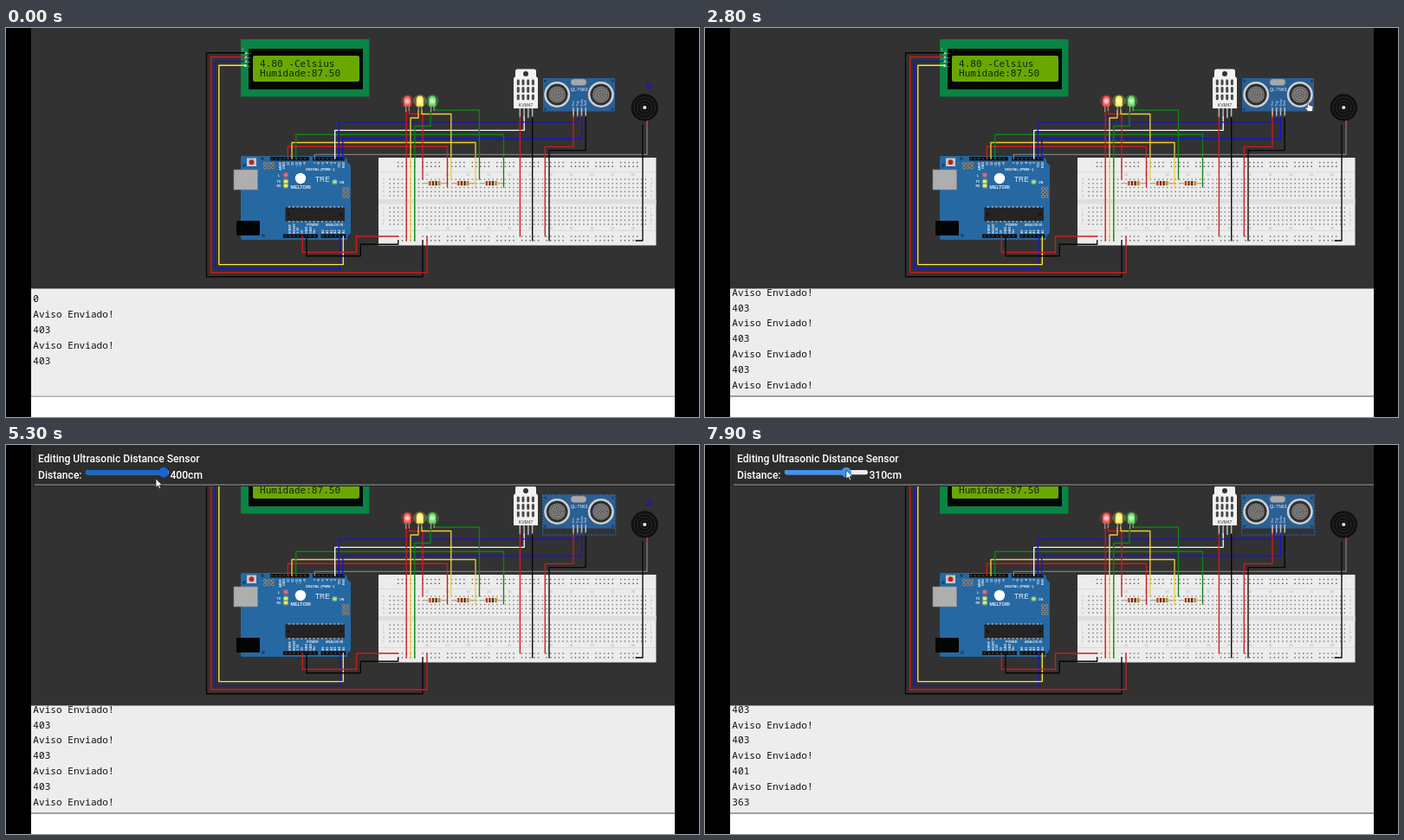
An HTML page for the animation above (8 s loop, 800 by 450 pixels).

```html
<!DOCTYPE html>
<html lang="pt">
<head>
<meta charset="utf-8">
<title>Circuit simulation</title>
<style>
html, body { margin: 0; width: 100%; height: 100%; overflow: hidden; background: #000; }
svg { display: block; width: 800px; height: 450px; }
text { white-space: pre; }
.ui { font: 500 12.1px Roboto, sans-serif; fill: #fff; }
.log { font: 11.12px "Noto Sans Mono", "DejaVu Sans Mono", monospace; fill: #111; }
.lcd { font: 11.05px "DejaVu Sans Mono", monospace; fill: #14230a; }
.tiny { font: 3.6px "Liberation Sans", Arial, sans-serif; fill: #e8f0f8; }
.bold { font-weight: bold; }
</style>
</head>
<body>
<svg id="stage" viewBox="0 0 800 450">
  <defs>
    <clipPath id="logClip"><rect x="29" y="302" width="743" height="123"/></clipPath>
    <radialGradient id="shine">
      <stop offset="0" stop-color="#fff" stop-opacity=".95"/>
      <stop offset="1" stop-color="#fff" stop-opacity="0"/>
    </radialGradient>
  </defs>
</svg>
<script>
const LOOP = 8000;
const svg = document.getElementById('stage');

function el(tag, attrs, parent = svg) {
  const node = document.createElementNS('http://www.w3.org/2000/svg', tag);
  for (const key in attrs) node.setAttribute(key, attrs[key]);
  parent.appendChild(node);
  return node;
}
const rect = (x, y, width, height, fill, more, parent) =>
  el('rect', { x, y, width, height, fill, ...more }, parent);
const circle = (cx, cy, r, fill, more, parent) =>
  el('circle', { cx, cy, r, fill, ...more }, parent);
const path = (d, more, parent) => el('path', { d, fill: 'none', ...more }, parent);
function text(x, y, str, cls, more, parent) {
  const node = el('text', { x, y, class: cls, ...more }, parent);
  node.textContent = str;
  return node;
}
const wire = (color, d) =>
  path(d, { stroke: color, 'stroke-width': 1.35, 'stroke-linejoin': 'round', 'stroke-linecap': 'round' });

const RED = '#d3191b', BLACK = '#060606', BLUE = '#1414d8', YELLOW = '#fbe840', GOLD = '#f0cc34',
      GREEN = '#0c8418', GRAY = '#7c7c7c', WHITE = '#f4f4f4';

// Workspace
rect(29, 0, 743, 302, '#323232');

function drawLcd() {
  rect(271, 13, 148.5, 66.5, '#098444');
  rect(280, 24, 132, 47, '#050505');
  rect(285, 32, 123, 30, '#69a800', { rx: 2 });
  text(293, 45, '4.80 -Celsius', 'lcd');
  text(293, 55.6, 'Humidade:87.50', 'lcd');
  ['GND', 'VCC', 'SDA', 'SCL'].forEach((name, i) => {
    circle(276.5, 29 + i * 4.8, 1.5, '#d8e4d8');
    text(278.6, 30.2 + i * 4.8, name, 'tiny', { style: 'font-size:2px' });
  });
  text(272.5, 26.3, '1', 'tiny');
}

function drawBoard() {
  path('M273 148H390L394 152V155L398 159V237L394 241V245H273Q271 245 271 243V150Q271 148 273 148Z',
    { fill: '#2668a2' });
  rect(263, 164, 27.5, 23, '#aeaeae', { stroke: '#888', 'stroke-width': .6 });
  rect(266, 223, 27, 17, '#040404', { rx: 1 });
  rect(278, 150.5, 11, 9.5, '#c9c9c9');
  circle(283.5, 155.2, 2.9, '#b4261f');
  for (const [x, y] of [[275, 159], [296, 151], [297, 240]]) circle(x, y, 2, '#174870');

  rect(305, 149, 45, 4.4, '#111');
  rect(354, 149, 37, 4.4, '#111');
  rect(320, 238.5, 40, 4.4, '#111');
  rect(363.5, 238.5, 29, 4.4, '#111');
  const pins = (x, y, n, labels, anchor, ly) => {
    for (let i = 0; i < n; i++) {
      const px = x + i * 4.75;
      rect(px - .8, y - .8, 1.6, 1.6, '#4a4a4a');
      const name = labels[i];
      if (name) text(px + 1.2, ly, name, 'tiny bold',
        { 'text-anchor': anchor, transform: `rotate(-90 ${px + 1.2} ${ly})` });
    }
  };
  pins(307, 151.2, 9, ['', '', 'AREF', 'GND', '13', '12', '~11', '~10', '~9'], 'end', 155);
  pins(356.5, 151.2, 8, ['7', '~6', '~5', '4', '~3', '2', 'TX1', 'RX0'], 'end', 155);
  pins(323, 240.8, 8, ['', 'IOREF', 'RESET', '3.3V', '5V', 'GND', 'GND', 'Vin'], 'start', 238);
  pins(366, 240.8, 6, ['A0', 'A1', 'A2', 'A3', 'A4', 'A5'], 'start', 238);
  text(346, 165, 'DIGITAL (PWM ~)', 'tiny bold', { style: 'font-size:4.1px' });
  text(347, 228.5, 'POWER', 'tiny bold');
  text(369, 228.5, 'ANALOG IN', 'tiny bold');

  circle(340, 174, 6.2, '#fff');
  text(357, 178.3, 'TRE', 'tiny', { style: 'font-size:8.4px' });
  text(328.5, 186, 'MELTORI', 'tiny bold', { style: 'font-size:5.3px' });
  text(314, 171.5, 'L', 'tiny bold');
  text(312.5, 179.2, 'TX', 'tiny bold');
  text(312.5, 184.2, 'RX', 'tiny bold');
  text(385, 179.5, 'ON', 'tiny bold');
  const lamp = (x, y, color) => {
    circle(x, y, 3.3, color, { opacity: .4 });
    rect(x - 2, y - 1.5, 4, 3, color);
  };
  lamp(323, 170, '#ff6666');
  lamp(323, 177.5, '#e9f25a');
  lamp(323, 182.5, '#e9f25a');
  lamp(379.5, 178, '#a8f08c');

  const icsp = (x, y, cols, rows) => {
    for (let i = 0; i < cols * rows; i++)
      circle(x + i % cols * 4.4, y + Math.floor(i / cols) * 4.4, 1.5, '#4b4440',
        { stroke: '#c4a37c', 'stroke-width': .8 });
  };
  icsp(299, 157, 3, 2);
  icsp(390, 186, 2, 3);

  rect(322.5, 207.5, 68.5, 16, '#242424');
  path('M326 207H389M326 224H389', { stroke: '#999', 'stroke-width': 2, 'stroke-dasharray': '2 2.75' });
  circle(326, 215.5, 1.5, '#111');
  circle(387, 215.5, 1.5, '#111');
}

function drawBreadboard() {
  rect(430, 150, 320.5, 101.5, '#ececec');
  rect(430, 198, 320.5, 5.5, '#dedede');
  path('M430 166.5H750M430 234.5H750', { stroke: '#dadada', 'stroke-width': 1 });
  const holes = (x1, x2, y, color, dash) => path(`M${x1} ${y}H${x2}`,
    { stroke: color, 'stroke-width': 1.7, 'stroke-linecap': 'round', 'stroke-dasharray': dash });
  const P = 4.76;
  for (const y of [175, 208])
    for (let i = 0; i < 5; i++) holes(443.2, 738.5, y + i * P, '#7d7d7d', `0 ${P}`);
  const group = `0 ${P} 0 ${P} 0 ${P} 0 ${P} 0 ${2 * P}`;
  for (const y of [155.5, 160.2, 241, 245.8]) holes(452.7, 729.5, y, '#686868', group);
  for (let c = 5; c <= 60; c += 5)
    for (const y of [170.5, 233.2])
      text(443.2 + (c - 1) * P, y, c, 'tiny', { 'text-anchor': 'middle', style: 'fill:#aaa' });
  [...'abcdefghij'].forEach((ch, i) => {
    const y = (i < 5 ? 195 - i * P : 228 - (i - 5) * P);
    for (const x of [435, 744]) text(x, y, ch, 'tiny', { style: 'fill:#aaa' });
  });
}

function drawResistor(x) {
  path(`M${x - 14} 179.6H${x + 14}`, { stroke: '#a8a8a8', 'stroke-width': 1.3 });
  rect(x - 8, 177.2, 16, 4.8, '#dcc08c', { rx: 1.8 });
  ['#b03020', '#7a1410', '#30201c', '#b8821c'].forEach((c, i) =>
    rect(x - 6.5 + i * 3.6, 177, 1.8, 5.2, c));
}

function drawLed(x, glow, body) {
  path(`M${x - 1.6} 90V97M${x + 2} 90V96`, { stroke: '#999', 'stroke-width': 1.2 });
  circle(x, 84.5, 7.5, glow, { opacity: .28 });
  path(`M${x - 4} 90.5V83Q${x - 4} 78.5 ${x} 78.5T${x + 4} 83V90.5Z`, { fill: body });
  circle(x, 84.5, 4.6, 'url(#shine)');
}

function drawClimateSensor() {
  path('M586 93V58L588 56V50Q588 47.5 590.5 47.5H609.5Q612 47.5 612 50V56L614 58V93Z', { fill: '#f2f2f2' });
  circle(600, 53, 3, '#323232');
  for (let r = 0; r < 3; r++)
    for (let c = 0; c < 4; c++) rect(589.8 + c * 5.7, 59.5 + r * 8.6, 3, 6.8, '#4a4a4a', { rx: 1.4 });
  text(600, 91, 'KVM47', 'tiny', { 'text-anchor': 'middle', style: 'fill:#333;font-size:5px' });
  for (let i = 0; i < 4; i++) rect(592.6 + i * 4.75, 93, 1.5, 11, '#b9b9b9');
}

function drawDistanceSensor() {
  rect(620, 58, 83, 38.5, '#2a5f94');
  for (const [x, y] of [[622.5, 61], [700.5, 61], [622.5, 94], [700.5, 94]]) circle(x, y, 1.5, '#1c3d60');
  for (const x of [636.2, 686.8]) {
    circle(x, 77, 15, '#d0d0d0');
    circle(x, 77, 12.4, '#303030');
    circle(x, 77, 9.6, '#7f7f7f');
    for (const r of [7.6, 4.6, 1.8])
      circle(x, 77, r, 'none', { stroke: '#4a4a4a', 'stroke-width': 1.3, 'stroke-dasharray': '1.2 1' });
  }
  rect(652, 59, 18, 7.5, '#a9a9a9', { rx: 3.7, stroke: '#777', 'stroke-width': .6 });
  text(661.5, 73, 'QL-TN63', 'tiny', { 'text-anchor': 'middle', style: 'font-size:4.8px' });
  ['Vcc', 'Trig', 'Echo', 'Gnd'].forEach((name, i) => {
    const x = 655 + i * 4.75;
    text(x + 1, 90.5, name, 'tiny', { transform: `rotate(-90 ${x + 1} 90.5)` });
    rect(x - .8, 92, 1.6, 11.5, '#b9b9b9');
  });
}

function drawBuzzer() {
  path('M735 104V112M740 104V112', { stroke: '#aaa', 'stroke-width': 1.2 });
  circle(737.3, 92, 15.7, '#101010');
  for (const r of [12.3, 8.6, 5]) circle(737.3, 92, r, 'none', { stroke: '#2f2f2f', 'stroke-width': .9 });
  circle(737.3, 92, 2.1, '#f0e8e4');
}

drawLcd();
drawBoard();
drawBreadboard();
[495, 528, 560.5].forEach(drawResistor);
drawClimateSensor();
drawDistanceSensor();
drawBuzzer();

wire(BLACK, 'M276 28.7H231.5V287.7H481V246');
wire(RED, 'M276 33.5H236.8V283H486V241');
wire(BLUE, 'M276 38.4H241.3V278.3H385.6V241');
wire(YELLOW, 'M276 43.2H245.8V273.6H389.3V241');
wire(RED, 'M342.3 241V259.5H404.5V241H452.7');
wire(BLACK, 'M347 241V263.7H409.3V250.2H452.7V246');
wire(RED, 'M325.3 151V137.2H509.5V184');
wire(GOLD, 'M330 151V132.5H542V184');
wire(GREEN, 'M334.7 151V123.2H574.5V184');
wire(GRAY, 'M356.3 151V146.4H740V112');
wire(WHITE, 'M379.7 151V118.3H598.2V103');
wire(BLUE, 'M384.3 151V108.8H660V102');
wire(BLUE, 'M388.8 151V128H664.6V102');
wire(RED, 'M740 108V112');
wire(RED, 'M462.2 95V246');
wire(RED, 'M465.6 95V99.5H481V175');
wire(GOLD, 'M476 95V104H467V246');
wire(GOLD, 'M480 95V99.5H513.8V175');
wire(GREEN, 'M490 95V113.5H471.8V246');
wire(GREEN, 'M494 95H546.5V175');
wire(RED, 'M593.4 103V241');
wire(BLACK, 'M607.7 103V246');
wire(RED, 'M655 102V137.3H622.3V241');
wire(BLACK, 'M669.2 102V141.6H627V246');
wire(BLACK, 'M735 108V246H727');
drawLed(463.3, '#ff4040', '#ff5555');
drawLed(477.8, '#ffe94a', '#fff04a');
drawLed(492.2, '#58e858', '#5be05b');

const note = el('g', {});
path('M741 68.3V64.3L744.8 65V69', { stroke: '#1a1abc', 'stroke-width': 1.3 }, note);
for (const [x, y] of [[740.4, 68.3], [744.2, 69]]) circle(x, y, 1.2, '#1a1abc', {}, note);
const outline = rect(619.5, 57.5, 84.3, 46.5, 'none',
  { stroke: '#2d6fae', 'stroke-width': 1, 'stroke-dasharray': '2 1.5' });

// Sensor panel
const panel = el('g', {});
rect(31, 0, 741, 48, '#262626', {}, panel);
rect(33, 0, 739, 45.6, '#2d2d2d', {}, panel);
rect(33, 45.4, 739, 1.3, '#858585', {}, panel);
text(37, 20, 'Editing Ultrasonic Distance Sensor', 'ui', {}, panel);
text(37, 38.5, 'Distance:', 'ui', {}, panel);
rect(92, 29, 96, 5.2, '#efefef', { rx: 2.6 }, panel);
const fill = rect(92, 29, 90, 5.2, '#0d75f2', { rx: 2.6 }, panel);
const thumb = circle(182, 31.6, 5.8, '#0d75f2', {}, panel);
const reading = text(189.5, 38.5, '', 'ui', {}, panel);

// Serial monitor
rect(29, 301.5, 743, 124.5, '#ededed');
const divider = rect(29, 425.2, 743, 1.3, '#8a8a8a');
rect(29, 426.5, 743, 23.5, '#fff');
const log = el('g', { 'clip-path': 'url(#logClip)' });
const rows = Array.from({ length: 7 }, () => text(31.3, 0, '', 'log', {}, log));
rect(0, 0, 29, 450, '#000');
rect(772, 0, 28, 450, '#000');

// Pointers
const arrow = path('M0 0V10.2L2.4 8L4 11.6L5.6 10.9L4.1 7.4H7.2Z',
  { fill: '#fff', stroke: '#222', 'stroke-width': .7 });
const hand = path('M-.9 1Q0 -.6 .9 1V4.5L5.2 5.8Q6 6.2 5.8 7.5L5 12H-.4L-3.6 7.6Q-3 6.2 -.9 7.8Z',
  { fill: '#fff', stroke: '#222', 'stroke-width': .7 });

const POINTER = [[2200, 758, 110], [2500, 715, 92], [2900, 690, 82], [3300, 391, 13], [3700, 391, 13],
  [4050, 94.5, 91.5], [4250, 94.5, 91.5], [4700, 150, 20], [5100, 173, 39], [5500, 173, 39],
  [5900, 181, 31], [6300, 181, 32], [6800, 174, 32], [7300, 172, 30], [7900, 163, 29]];
const DISTANCE = [[6300, 400], [6800, 367], [7300, 361], [7900, 310]];

function sample(keys, t) {
  if (t <= keys[0][0]) return keys[0].slice(1);
  for (let i = 1; i < keys.length; i++) {
    const [a, b] = [keys[i - 1], keys[i]];
    if (t <= b[0]) {
      const u = (t - a[0]) / (b[0] - a[0]);
      return a.slice(1).map((v, k) => v + (b[k + 1] - v) * u);
    }
  }
  return keys[keys.length - 1].slice(1);
}

const show = (node, on) => node.setAttribute('visibility', on ? 'visible' : 'hidden');

function logLine(i) {
  if (i === 0) return '0';
  if (i % 2) return 'Aviso Enviado!';
  return { 22: '401', 24: '363' }[i] || '403';
}

function drawLog(t) {
  const count = 5 + Math.floor((t + 500) / 800) + Math.floor((t + 200) / 800);
  const first = Math.max(0, count - 7);
  const scrolled = count > 6;
  const top = scrolled ? 309.7 : 317.2;
  divider.setAttribute('fill', scrolled ? '#8a8a8a' : '#c6c6c6');
  rows.forEach((row, i) => {
    row.textContent = first + i < count ? logLine(first + i) : '';
    row.setAttribute('y', top + i * 17.83);
  });
}

function drawPanel(t) {
  const open = t >= 2900;
  show(panel, open);
  show(outline, open);
  const cm = Math.round(sample(DISTANCE, t)[0]);
  const x = 98 + 84 * cm / 400;
  const color = t >= 6300 ? '#3b93f7' : t >= 5100 ? '#1467d2' : '#0d75f2';
  thumb.setAttribute('cx', x);
  thumb.setAttribute('fill', color);
  fill.setAttribute('width', x - 92);
  fill.setAttribute('fill', color);
  reading.textContent = cm + 'cm';
}

function drawPointer(t) {
  const [x, y] = sample(POINTER, t);
  const visible = t >= 2200, overPanel = y < 47;
  for (const [node, on] of [[arrow, overPanel], [hand, !overPanel]]) {
    show(node, visible && on);
    node.setAttribute('transform', `translate(${x} ${y})`);
  }
}

function render(t) {
  show(note, t % 750 < 375);
  drawLog(t);
  drawPanel(t);
  drawPointer(t);
}

const start = performance.now();
function tick() {
  render((performance.now() - start) % LOOP);
  requestAnimationFrame(tick);
}
tick();
</script>
</body>
</html>
```
